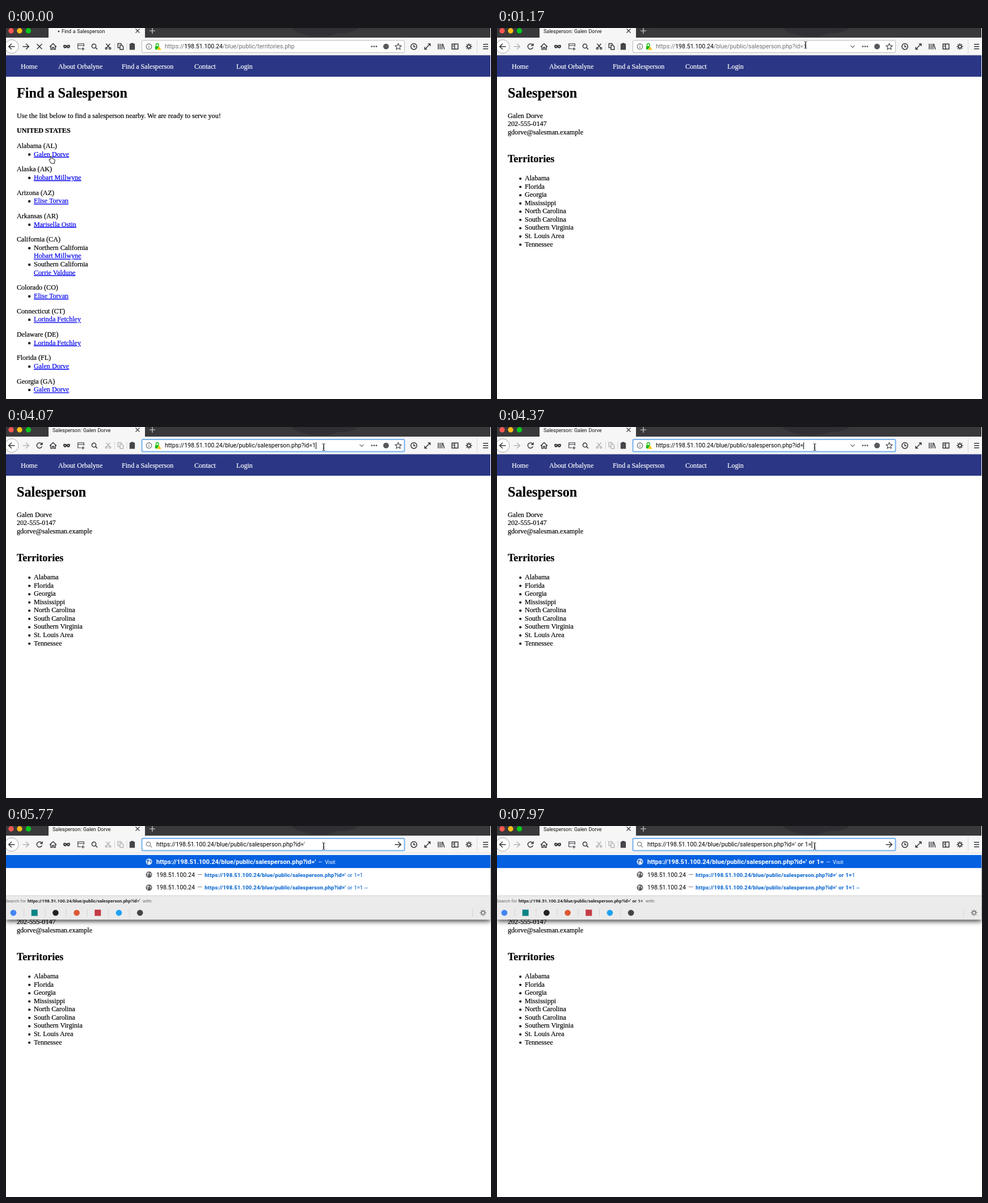
Recreate the animation shown at these times as an HTML page. Size 855 by 655 pixels, loop 8 s.

```html
<!DOCTYPE html>
<html lang="en">
<head>
<meta charset="utf-8">
<title>Find a Salesperson</title>
<style>
html, body { margin: 0; width: 100%; height: 100%; overflow: hidden; background: #fff; }
svg { display: block; }
text { white-space: pre; font-family: Roboto, Inter, sans-serif; word-spacing: .05em; }
#page text { font: 12.1px "Liberation Serif", serif; word-spacing: 0; stroke: #000; stroke-width: .2; }
#page .h1 { font-size: 24.2px; font-weight: bold; }
#page .h2 { font-size: 18px; font-weight: bold; }
#page .strong { font-weight: bold; }
#page .nav { fill: #fff; stroke: #fff; }
#page .link { fill: #00e; stroke: #00e; text-decoration: underline; }
.icon { fill: none; stroke: #37373b; stroke-width: 1.5; }
.tab { font-size: 8.95px; fill: #111; }
.url { font-size: 10.56px; }
.dim { fill: #6f6f6f; }
.row { font-size: 10.6px; }
.top { font-size: 11.2px; font-weight: 600; fill: #fff; }
.dash { font-size: 12px; fill: #777; }
.small { font-size: 9.43px; font-weight: 400; }
.addr { fill: #116bd2; stroke: #116bd2; stroke-width: .12; }
.action { fill: #008a85; }
.hit { font-weight: 600; letter-spacing: .22px; }
.find { font-size: 7.9px; fill: #666; }
.find tspan { fill: #222; font-weight: 600; }
#popup { filter: drop-shadow(0 3px 4px rgba(0, 0, 0, .75)); }
</style>
</head>
<body>
<svg width="855" height="655" viewBox="0 0 855 655">
  <g id="page"></g>
  <g id="popup"></g>
  <g id="chrome"></g>
  <g id="field"></g>
  <g id="cursor"></g>
</svg>
<script>
const LOOP = 8000;
const HOST = '198.51.100.24';
const FOLDER = '/blue/public/';
const SCRIPT = 'salesperson.php?id=';
const LINK = 'https://' + HOST + FOLDER + SCRIPT;
const A = 'Galen Dorve', B = 'Hobart Millwyne', C = 'Elise Torvan',
      D = 'Marisella Ostin', E = 'Corrie Valdune', F = 'Lorinda Fetchley';

const $ = id => document.getElementById(id);
const text = (x, y, s, cls = '') => `<text x="${x}" y="${y}" class="${cls}">${s}</text>`;
const span = (s, cls, dx) => `<tspan class="${cls}" ${dx ? `dx="${dx}"` : ''}>${s}</tspan>`;
const rect = (x, y, w, h, fill, more = '') =>
  `<rect x="${x}" y="${y}" width="${w}" height="${h}" fill="${fill}" ${more}/>`;
const dot = (x, y, r, fill, more = '') => `<circle cx="${x}" cy="${y}" r="${r}" fill="${fill}" ${more}/>`;
const icon = (x, d, more = '', y = 32.7) =>
  `<path class="icon" transform="translate(${x} ${y})" d="${d}" ${more}/>`;
const style = s => `style="${s}"`;
const GREY = style('stroke:#b4b4b6');
const THIN = style('stroke-width:1.1');

const ARROW = 'M-5.5 0H5M0-5L5.3 0L0 5';
const CROSS = 'M-4.5-4.5L4.5 4.5M4.5-4.5L-4.5 4.5';
const LENS = 'M1.9 1.9L5 5M2.6-.8A3.6 3.6 0 1 1-4.6-.8A3.6 3.6 0 1 1 2.6-.8';
const GEAR = 'M2.8 0A2.8 2.8 0 1 1-2.8 0A2.8 2.8 0 1 1 2.8 0M3 0H5.7M-3 0H-5.7M0 3V5.7M0-3V-5.7'
  + 'M2.1 2.1L4 4M-2.1-2.1L-4-4M2.1-2.1L4-4M-2.1 2.1L-4 4';

// ---- web pages ----
function nav() {
  const items = [[26, 'Home'], [92, 'About Orbalyne'], [204, 'Find a Salesperson'], [332, 'Contact'], [406, 'Login']];
  return rect(0, 48, 854, 38, '#2b3785') + items.map(([x, s]) => text(x, 72, s, 'nav')).join('');
}

function listPage() {
  let out = text(19, 123, 'Find a Salesperson', 'h1')
    + text(19, 158.7, 'Use the list below to find a salesperson nearby. We are ready to serve you!')
    + text(19, 185, 'UNITED STATES', 'strong');
  const states = [['Alabama (AL)', A], ['Alaska (AK)', B], ['Arizona (AZ)', C], ['Arkansas (AR)', D],
    ['California (CA)', '*Northern California', B, '*Southern California', E], ['Colorado (CO)', C],
    ['Connecticut (CT)', F], ['Delaware (DE)', F], ['Florida (FL)', A], ['Georgia (GA)', A]];
  let y = 212;
  for (const [state, ...lines] of states) {
    out += text(19, y, state);
    lines.forEach((s, i) => {
      y += 14.6;
      if (i % 2 == 0) out += rect(39.3, y - 5.1, 3.8, 3.8, '#000');
      out += s[0] == '*' ? text(49, y, s.slice(1)) : text(49, y, s, 'link');
    });
    y += 26.72;
  }
  return out;
}

function personPage() {
  const places = ['Alabama', 'Florida', 'Georgia', 'Mississippi', 'North Carolina', 'South Carolina',
    'Southern Virginia', 'St. Louis Area', 'Tennessee'];
  return text(19, 123, 'Salesperson', 'h1')
    + [A, '202-555-0147', 'gdorve@salesman.example'].map((s, i) => text(19, 158.7 + i * 14.6, s)).join('')
    + text(19, 237, 'Territories', 'h2')
    + places.map((s, i) => dot(41.2, 266 + i * 14.57, 2, '#000') + text(49, 269 + i * 14.57, s)).join('');
}

// ---- browser frame ----
function chrome(loading, copyable) {
  const cut = copyable ? '' : GREY;
  return rect(0, 0, 854, 17, '#39393b')
    + '<path d="M502 0H622C612 7 600 10 584 9C566 20 520 16 502 0Z" fill="#303034"/>'
    + dot(9, 5, 4.7, '#fc5650') + dot(24, 5, 4.7, '#fdbd17') + dot(39.5, 5, 4.7, '#08c81c')
    + rect(75, 0, 170, 18, '#f6f6f7')
    + (loading ? text(98, 8.7, 'Find a Salesperson', 'tab') : text(82, 8.7, 'Salesperson: ' + A, 'tab'))
    + icon(232, 'M-3.5-3.5L3.5 3.5M3.5-3.5L-3.5 3.5', THIN, 5)
    + icon(258, 'M-5 0H5M0-5V5', style('stroke:#d8d8da;stroke-width:1.2'), 5)
    + rect(0, 17, 854, 31, '#f6f6f7') + rect(0, 47.5, 854, .8, '#c9c9cb')
    + dot(10, 32.7, 12, '#fdfdfd', 'stroke="#a9a9ab"')
    + icon(10, 'M5.5 0H-5M0-5L-5.3 0L0 5') + icon(35, ARROW, loading ? '' : GREY)
    + icon(59, loading ? CROSS : 'M4-2.6A4.7 4.7 0 1 0 4.4 1.6M4.9-5.5V-1.8H1.2')
    + icon(83, 'M-6 .5L0-5.2L6 .5M-4-1V5H-1.3V1.5H1.3V5H4V-1')
    + icon(107, 'M-6-1C-6-4-2-3 0-2C2-3 6-4 6-1C6 4 2 4 0 1.2C-2 4-6 4-6-1ZM-4.3-.2Q-3-1.6-1.5 0Q-3 1.4-4.3-.2ZM4.3-.2Q3-1.6 1.5 0Q3 1.4 4.3-.2Z',
      'fill-rule="evenodd" ' + style('fill:#37373b;stroke:none'))
    + icon(132, 'M0 4H-5.3V-5H5.3V0M-5.3-2H5.3M3.6 1.5V7M.8 4.2H6.4', THIN)
    + icon(156, LENS)
    + icon(180, 'M-3.5-5L2.5 2M3.5-5L-2.5 2M-1.6 3.3A1.6 1.6 0 1 1-4.8 3.3A1.6 1.6 0 1 1-1.6 3.3M4.8 3.3A1.6 1.6 0 1 1 1.6 3.3A1.6 1.6 0 1 1 4.8 3.3', cut)
    + rect(191, 26, .8, 13, '#ccc')
    + icon(202, 'M-1 2H-4.7V-5.3H.5L2-3.5M-1-2.3H2.5L4.7 0V5.3H-1Z', cut)
    + rect(212.5, 26, .8, 13, '#ccc')
    + icon(222.5, 'M-4-4.3H4V5.3H-4ZM-1.6-5.5H1.6V-3.5H-1.6ZM-2-1H2V3H-2Z', style('fill:#55555a;stroke-width:1.2'))
    + icon(719, 'M5.2 0A5.2 5.2 0 1 1-5.2 0A5.2 5.2 0 1 1 5.2 0M0-3.2V.5H2.8')
    + icon(743, 'M-4.5 4.5L4.5-4.5M.8-4.8H4.8V-.8M-.8 4.8H-4.8V.8')
    + icon(767, 'M-5-5V5M-1.7-5V5M1.5-5V5M3-4.5L5.8 5')
    + icon(791.5, 'M-5.3-4.5H5.3V4.5H-5.3ZM-.7-4.5V4.5M-3.7-2H-2.2M-3.7 0H-2.2')
    + icon(816, GEAR)
    + rect(830, 20, .8, 25, '#d2d2d4')
    + icon(845.5, 'M-4.5-4H4.5M-4.5 0H4.5M-4.5 4H4.5');
}

function field(s) {
  let out = rect(239.5, 22, 463, 21.5, '#fff', s.focus
    ? 'rx="2" stroke="#77b1ee" stroke-width="2"' : 'rx="2" stroke="#b9b9bb"');
  if (s.open) {
    out += icon(252, LENS, style('stroke:#777;stroke-width:1.2')) + icon(691, ARROW);
  } else {
    out += icon(252, 'M4.8 0A4.8 4.8 0 1 1-4.8 0A4.8 4.8 0 1 1 4.8 0M0-.8V2.8M0-2.9V-1.7', style('stroke:#666;stroke-width:1.1'))
      + icon(267, 'M-2.5-1V-3A2.2 2.2 0 0 1 1.9-3V-1', style('stroke:#12bc00'))
      + rect(263, 32, 7.5, 6, '#12bc00', 'rx="1"')
      + '<path d="M270 32L274 39H266Z" fill="#ffbf00" stroke="#fff" stroke-width=".6"/>'
      + (s.loading ? '' : icon(627, 'M-3.6-1.8L0 1.8L3.6-1.8', style('stroke:#666;stroke-width:1.2')))
      + [645, 649, 653].map(x => dot(x, 32.7, 1.4, '#555')).join('')
      + dot(670, 32.7, 5, '#59595d')
      + icon(691.5, 'M0-5.3L1.6-1.8L5.4-1.4L2.6 1.2L3.4 5L0 3.1L-3.4 5L-2.6 1.2L-5.4-1.4L-1.6-1.8Z', THIN);
  }
  const x = s.open ? 265 : 280;
  const path = FOLDER + (s.loading ? 'territories.php' : SCRIPT + s.typed);
  const label = s.focus ? 'https://' + HOST + path
    : span('https://', 'dim') + HOST + span(path, 'dim');
  $('field').innerHTML = out + '<path id="mark"/>' + text(x, 36.4, label, 'url');
  const end = x + $('field').querySelector('text').getComputedTextLength();
  if (s.selected) {
    $('mark').setAttribute('d', `M${x} 26.5H${end}V39.5H${x}Z`);
    $('mark').setAttribute('fill', '#a6d0fb');
  } else if (s.caret) {
    $('mark').setAttribute('d', `M${end + .2} 27h1v12h-1Z`);
  }
}

// ---- suggestion list ----
const hits = [['Salesperson: ' + A], [HOST, "' or 1=1"], [HOST, "' or 1=1 --"], [HOST, "xxx') OR 1 = 1 -- ]"],
  ['Salesperson: ' + B, '4'], [HOST, '" or 1=1'], [HOST, '" or 1=1 #'], [HOST, '" or 1=1 --'], [HOST, '10']];

const globe = (y, colour, land) => dot(252, y, 5.5, colour)
  + `<path d="M248 ${y - 3}l4-1 1 3-3 1 1 3-2 1zM254 ${y - 3}l2 1 0 4-2-1z" fill="${land}"/>`;

function address(tail, typed) {
  const match = tail.startsWith(typed);
  return span(match ? span(LINK + typed, 'hit') + tail.slice(typed.length) : LINK + tail, 'small addr');
}

function popup(s) {
  if (!s.open) return '';
  const rows = s.few ? hits.slice(1, 3) : hits;
  const dash = span('—', 'dash', 4) + span('\u200a', 'dash', 2.8);
  const foot = 54.4 + (rows.length + 1) * 22.83;
  let out = rect(0, 48, 854, foot - 48, '#fff') + rect(0, 51.2, 854, 23, '#0560e0') + globe(63, '#e4edfb', '#4a7fc4')
    + text(265, 66.8, LINK + s.typed + span('—', 'small', 4) + span('Visit', 'small', 4.5), 'top');
  rows.forEach(([title, tail], i) => {
    const y = 63 + (i + 1) * 22.83;
    out += globe(y, '#58585c', '#c9c9cb')
      + text(265, y + 3.8, title + dash + (tail ? address(tail, s.typed) : span('Switch to Tab', 'small action')), 'row');
    if (!tail) out += rect(231, y - 4, 9, 6, '#999') + rect(229.5, y + 2.5, 12, 1.5, '#999');
  });
  out += rect(0, foot, 854, 42.5, '#ebebec') + rect(0, foot, 854, .8, '#d4d4d6')
    + text(-1, foot + 11.8, 'Search for ' + span(LINK + s.typed, '') + '  with:', 'find');
  const y = foot + 30.3;
  ['#4285f4', '#0c8484', '#222', '#de5833', '#c43b45', '#1da1f2', '#444'].forEach((c, i) => {
    const x = 13 + i * 37.2;
    out += i == 1 || i == 4 ? rect(x - 5.5, y - 5.5, 11, 11, c) : dot(x, y, 5.3, c);
    if (i) out += rect(x - 18.8, y - 7, .8, 14, '#cfcfd1');
  });
  return out + rect(822, y - 7, .8, 14, '#cfcfd1')
    + icon(841, GEAR, style('stroke:#666;stroke-width:1.2'), y);
}

// ---- pointer ----
const shapes = {
  hand: '<path d="M-2.5-6.5Q-1-7.5-.6-5.5L0-2.5Q1.5-3 2-1.8Q3.6-2.2 4-1Q5.5-1 5.3 1L4.5 4V6H-1.5L-5-.2Q-5-2-3-.6Z" fill="#fff" stroke="#111"/>',
  arrow: '<path d="M0 0V12L2.8 9.4L4.8 14L6.8 13L4.8 8.6H8.6Z" fill="#111" stroke="#fff" stroke-width=".8"/>',
  beam: '<path d="M-2.4-6Q0-6 0-4.5V4.5Q0 6-2.4 6M2.4-6Q0-6 0-4.5V4.5Q0 6 2.4 6M-1.3 1.5H1.3" fill="none" stroke="#222"/>'
};
const stops = [[300, 81, 233], [1130, 544, 30], [1300, 544, 30], [1650, 560, 35.5]];

function pointer(t) {
  let [, x, y] = stops[0];
  for (let i = 1; i < stops.length; i++) {
    const [t0, x0, y0] = stops[i - 1], [t1, x1, y1] = stops[i];
    if (t < t0) break;
    const p = Math.min(1, (t - t0) / (t1 - t0)), e = p * p * (3 - 2 * p);
    x = x0 + (x1 - x0) * e;
    y = y0 + (y1 - y0) * e;
  }
  return [x, y];
}

// ---- timeline ----
const keys = [[0, '1'], [4330, ''], [5170, "'"], [6970, "' "], [7110, "' o"], [7250, "' or"],
  [7400, "' or "], [7830, "' or 1"], [7930, "' or 1="]];
const hiddenCaret = [[3530, 4050], [5000, 5170], [5710, 6250], [6780, 6970]];

function stateAt(t) {
  return {
    loading: t < 200,
    focus: t >= 1730,
    selected: t >= 1730 && t < 2970,
    caret: t >= 2970 && !hiddenCaret.some(([a, b]) => t >= a && t < b),
    typed: keys.filter(([at]) => t >= at).pop()[1],
    open: t >= 4430,
    few: t >= 5420
  };
}

let last = '';
function draw(now) {
  const t = now % LOOP, s = stateAt(t), key = JSON.stringify(s);
  if (key != last) {
    last = key;
    $('page').innerHTML = nav() + (s.loading ? listPage() : personPage());
    $('popup').innerHTML = popup(s);
    $('chrome').innerHTML = chrome(s.loading, t < 2970)
      + (s.loading ? dot(93, 6, 1.4, '#333', 'id="busy"') : '');
    field(s);
  }
  if (s.loading) $('busy').setAttribute('cx', 93 - 4 * Math.sin(t / 130));
  const [x, y] = pointer(t);
  $('cursor').setAttribute('transform', `translate(${x} ${y})`);
  const shape = y < 43 ? 'beam' : s.loading ? 'hand' : 'arrow';
  if ($('cursor').dataset.shape != shape) {
    $('cursor').dataset.shape = shape;
    $('cursor').innerHTML = shapes[shape];
  }
  requestAnimationFrame(draw);
}
requestAnimationFrame(draw);
</script>
</body>
</html>
```
